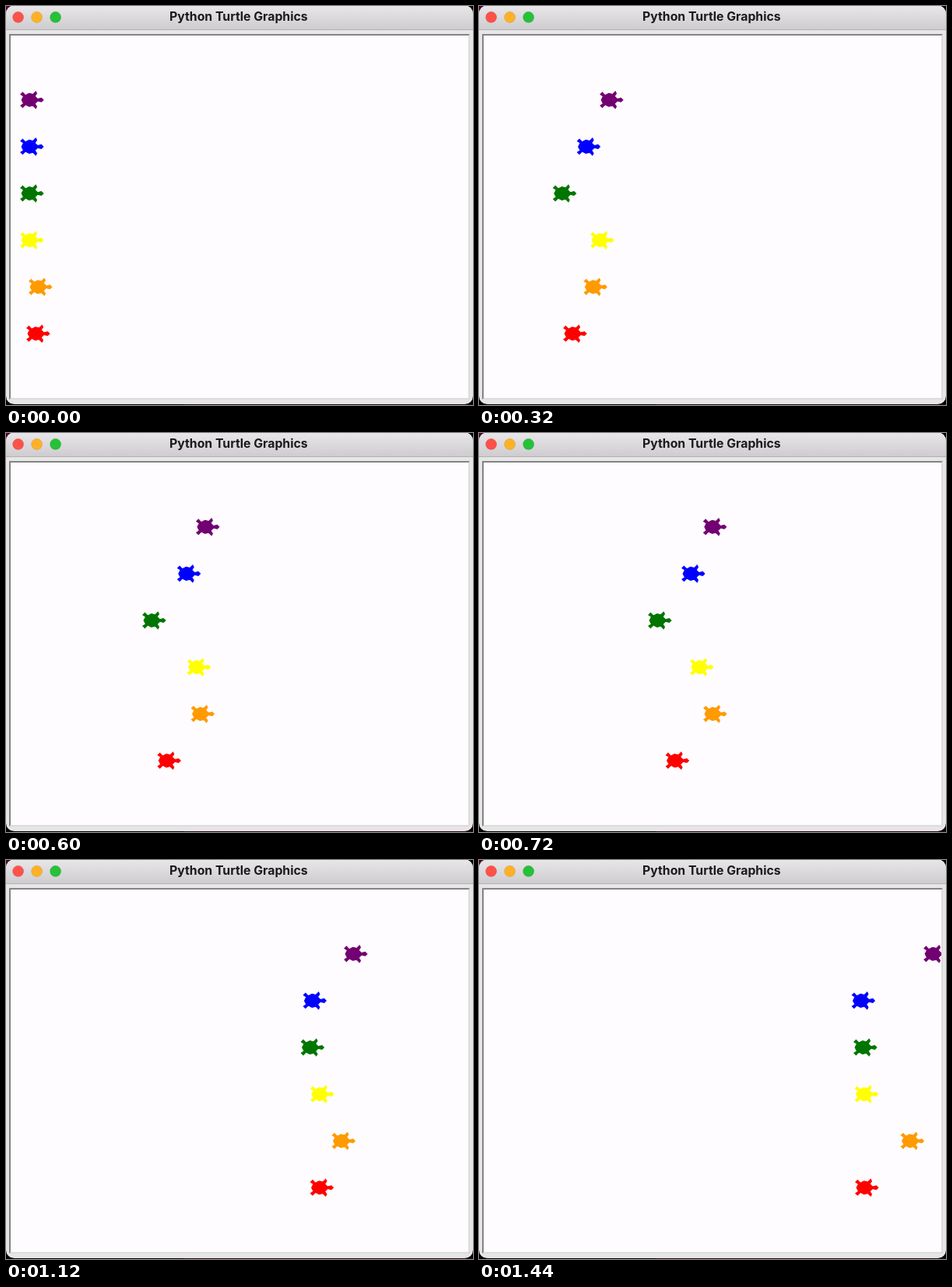
An HTML page that plays this animation: 600x513 px, repeating every 1.46 s.

```html
<!DOCTYPE html>
<html lang="en">
<head>
<meta charset="utf-8">
<title>Turtle race</title>
<style>
  html, body { margin: 0; width: 100%; height: 100%; overflow: hidden; background: #000; }
  svg { display: block; width: 600px; height: 513px; }
  text { font: 700 15.8px Inter, "Open Sans", sans-serif; fill: #1c1a1c; text-anchor: middle; }
</style>
</head>
<body>
<svg viewBox="0 0 600 513">
  <defs>
    <linearGradient id="bar" x2="0" y2="1">
      <stop stop-color="#e8e6e8"/>
      <stop offset="1" stop-color="#cecccf"/>
    </linearGradient>
    <clipPath id="window"><rect y="-.5" width="600" height="512.5" rx="10.5"/></clipPath>
    <clipPath id="field"><rect x="6" y="38" width="588" height="466"/></clipPath>
    <path id="turtle" transform="scale(1.2)"
      d="M16 0L14 2 10 1 7 4 9 7 8 9 5 6 1 7-3 5-6 8-8 6-5 4-7 0-5-4-8-6-6-8-3-5 1-7 5-6 8-9 9-7 7-4 10-1 14-2Z"/>
  </defs>

  <rect width="8" height="8" fill="#4a0a28"/>
  <rect x="228" y="512" width="372" height="1" fill="#2a0614"/>

  <g clip-path="url(#window)">
    <rect width="600" height="513" fill="#e7e6e7"/>
    <rect width="600" height="30" fill="url(#bar)"/>
    <rect y="30" width="600" height="1" fill="#b3b1b3"/>
  </g>
  <g stroke="#000" stroke-opacity=".1" stroke-width=".8">
    <circle cx="15.6" cy="14.4" r="7.1" fill="#fd5149"/>
    <circle cx="39.6" cy="14.4" r="7.1" fill="#fdb126"/>
    <circle cx="63.6" cy="14.4" r="7.1" fill="#25c138"/>
  </g>
  <text x="298.8" y="19.3">Python Turtle Graphics</text>

  <rect x="4" y="36" width="592" height="470" fill="#dddcdd"/>
  <path fill="#858485" d="M4 36H596L594 38H6V504L4 506Z"/>
  <rect x="6" y="38" width="588" height="466" fill="#fefcfe"/>
  <g id="race" clip-path="url(#field)"></g>
</svg>
<script>
  const LOOP = 1460, TICK = 20, FINISH = 1440;
  const NOSE = 19.4, TOP = 120.8, GAP = 60.1;
  const race = document.getElementById('race');
  const turtles = [];

  // Runs from one x to another; each bend [ms, x] is where the pace changes.
  function addTurtle(color, from, to, ...bends) {
    const el = document.createElementNS('http://www.w3.org/2000/svg', 'use');
    el.setAttribute('href', '#turtle');
    el.setAttribute('fill', color);
    el.setAttribute('stroke', color);
    race.append(el);
    const y = TOP + turtles.length * GAP;
    turtles.push({ el, y, path: [[0, from], ...bends, [FINISH, to]] });
  }

  addTurtle('#720072', 48, 601, [320, 185], [480, 230], [1120, 464]);
  addTurtle('#0000ff', 48, 508.5, [720, 290]);
  addTurtle('#007500', 48, 511, [480, 163], [880, 303], [1120, 408.5]);
  addTurtle('#ffff00', 48, 512.5, [320, 173], [880, 352]);
  addTurtle('#ff9a00', 59, 571.5, [480, 217], [720, 318], [1120, 448.5]);
  addTurtle('#ff0000', 56, 513, [480, 179], [1120, 420.5]);

  function along(path, t) {
    const i = path.findIndex(([end]) => t <= end) || 1;
    const [t0, x0] = path[i - 1], [t1, x1] = path[i];
    return x0 + (x1 - x0) * (t - t0) / (t1 - t0);
  }

  function draw(now) {
    const t = Math.floor((now % LOOP) / TICK) * TICK;
    for (const { el, y, path } of turtles) {
      el.setAttribute('transform', `translate(${along(path, t) - NOSE} ${y})`);
    }
  }

  function loop() {
    draw(performance.now());
    requestAnimationFrame(loop);
  }
  draw(0);
  requestAnimationFrame(loop);
</script>
</body>
</html>
```
